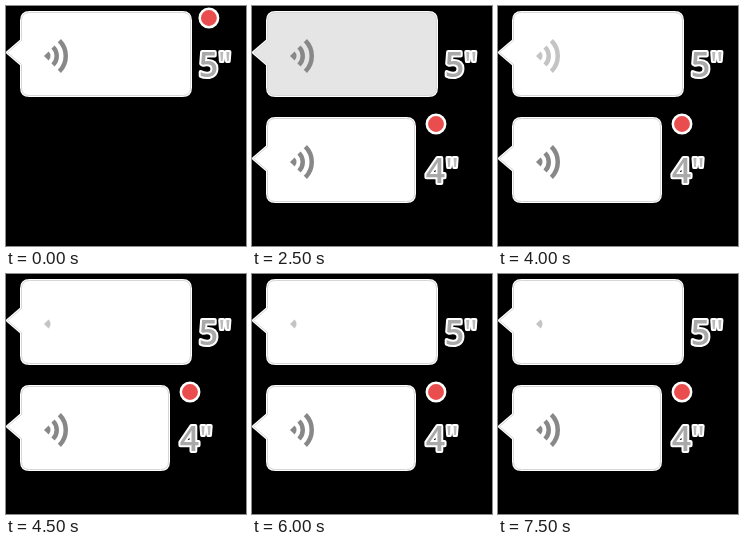
Recreate the animation shown at these times as an HTML page. Size 240x240 px, loop 8000 ms.

```html
<!DOCTYPE html>
<html lang="en">
<head>
<meta charset="utf-8">
<title>Voice messages</title>
<style>
  html, body { margin: 0; width: 100%; height: 100%; overflow: hidden; background: #000; }
  svg { display: block; width: 100vw; height: 100vh; }
  .edge { fill: #fff; stroke: #fff; stroke-width: 3; stroke-linejoin: round; }
  .bubble { fill: #fff; stroke: #d6d6d6; stroke-width: 1; stroke-linejoin: round; }
  .bubble.pressed { fill: #e5e5e5; }
  .icon { color: #888; }
  .icon.playing { color: #c4c4c4; }
  .wedge { fill: currentColor; }
  .arc { fill: none; stroke: currentColor; stroke-width: 4.5; }
  .unread { fill: #ea4d4d; stroke: #fff; stroke-width: 2.5; }
  text {
    font: 600 34px "Open Sans", "Noto Sans", sans-serif;
    fill: #a9a9a9; stroke: #fff; stroke-width: 4;
    stroke-linejoin: round; paint-order: stroke;
  }
  .unit { font-weight: 400; fill: #bbb; }
</style>
</head>
<body>
<svg id="stage" viewBox="0 0 240 240"></svg>
<script>
const LOOP = 8000;
const PRESS = 500, READ = 2500, PLAY = 3000, STEP = 500;

// Rounded speech bubble with its tail on the left
const bubblePath = right => `M23.5 6.5H${right - 8}q8 0 8 8V81.5q0 8-8 8H23.5q-8 0-8-8V58.5
  L1.5 46.5L15.5 34.5V14.5q0-8 8-8Z`;

// Quarter arc around the icon's left point
function arcPath(r) {
  const d = r * Math.SQRT1_2;
  return `M${38 + d} ${50 - d}A${r} ${r} 0 0 1 ${38 + d} ${50 + d}`;
}

const message = (id, y, right, labelX, seconds) => `
  <g id="${id}" transform="translate(0 ${y})">
    <path class="edge" d="${bubblePath(right)}"/>
    <path class="bubble" d="${bubblePath(right)}"/>
    <g class="icon">
      <path class="wedge" d="${arcPath(6.5)}L38 50Z"/>
      <path class="arc" d="${arcPath(12.75)}"/>
      <path class="arc" d="${arcPath(21.75)}"/>
    </g>
    <circle class="unread" cx="${labelX + 10.2}" cy="12" r="9.2"/>
    <text x="${labelX}" y="70.5">${seconds}<tspan class="unit">"</tspan></text>
  </g>`;

const stage = document.getElementById("stage");
stage.innerHTML = message("first", 0, 184.5, 192.7, 5) + message("second", 106, 162.5, 173.8, 4);

const first = document.getElementById("first");
const second = document.getElementById("second");
const bubble = first.querySelector(".bubble");
const icon = first.querySelector(".icon");
const arcs = first.querySelectorAll(".arc");
const unread = first.querySelector(".unread");

const show = (el, on) => el.setAttribute("visibility", on ? "visible" : "hidden");

function draw(t) {
  const playing = t >= PLAY;
  const waves = playing ? Math.floor((t - PLAY) / STEP) % 3 : 2;
  show(second, t >= PRESS);
  show(unread, t < READ);
  bubble.classList.toggle("pressed", t >= PRESS && !playing);
  icon.classList.toggle("playing", playing);
  arcs.forEach((arc, i) => show(arc, i < waves));
}

const start = performance.now();
function tick() {
  draw((performance.now() - start) % LOOP);
  requestAnimationFrame(tick);
}
tick();
</script>
</body>
</html>
```
